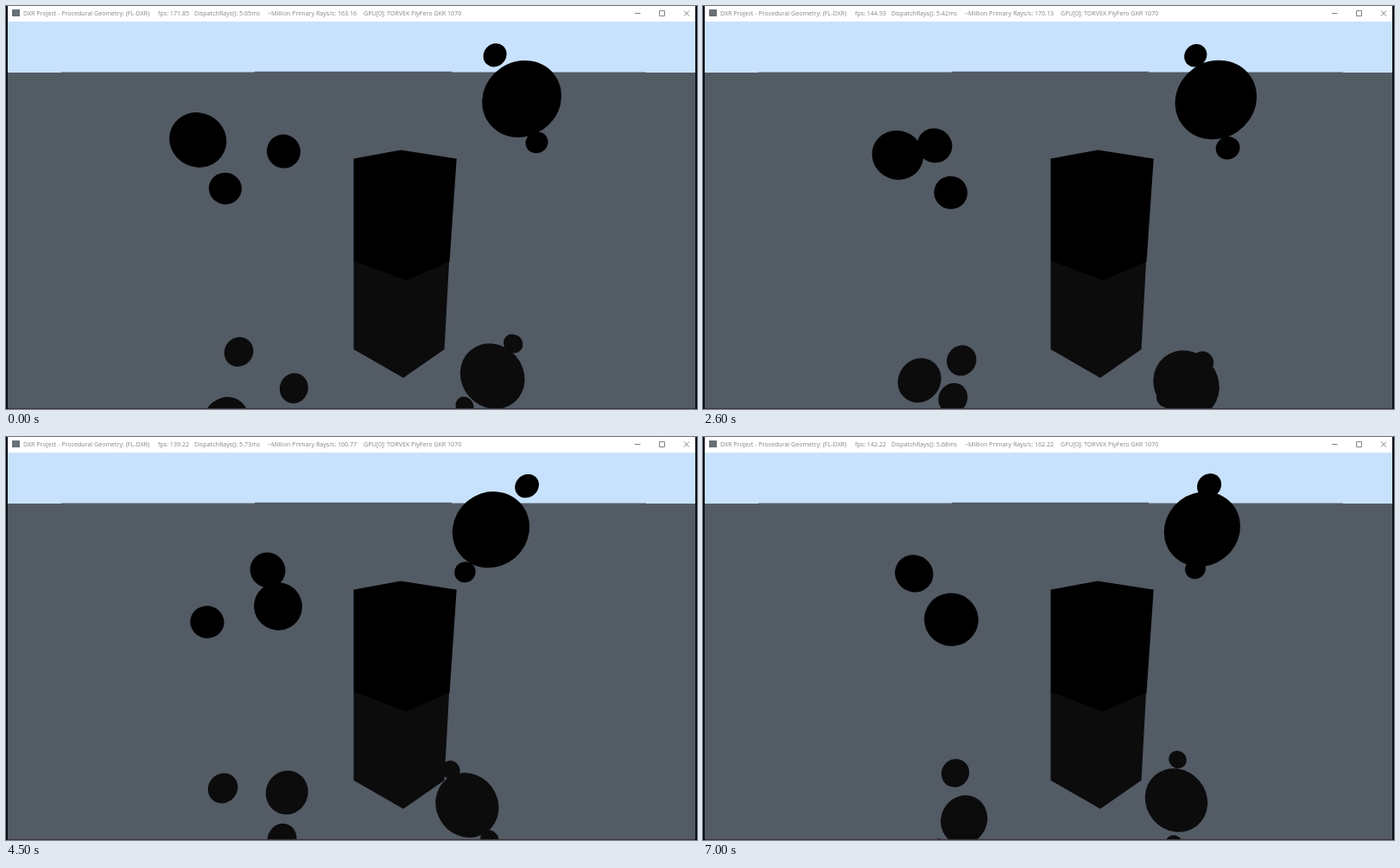
Animation, 800 px wide and 466 px high, one loop 7100 ms. Source, as an HTML page:

```html
<!DOCTYPE html>
<html lang="en">
<head>
<meta charset="utf-8">
<title>Procedural Geometry</title>
<style>
html, body { margin: 0; width: 100%; height: 100%; overflow: hidden; background: #fff; }
svg { display: block; width: 100vw; height: 100vh; }
text { font: 7.1px "Open Sans", "Noto Sans", sans-serif; fill: #858585; }
</style>
</head>
<body>
<svg viewBox="0 0 800 466" preserveAspectRatio="none">
  <rect width="800" height="466" fill="#535b65"/>
  <path d="M0 18H800V77H741V76.4H516V75.8H288V76.4H64V77H0Z" fill="#c8e2fd"/>
  <g id="mirror" fill="#0c0c0d"></g>
  <path d="M402.5 294L463 317L513 296L507.5 397L460 430L402.5 397Z" fill="#0c0c0d"/>
  <path d="M402.5 176.5L457 166.5L521.7 176.5L513.5 296L463 317.5L402.5 294.5Z"/>
  <g id="solid" fill="#000"></g>
  <rect y="465" width="800" height="1" fill="#3b3238"/>
  <rect width="800" height="18" fill="#fff"/>
  <rect x="7" y="4" width="9" height="8" fill="#6b7076"/>
  <text x="20" y="11">DXR Project - Procedural Geometry: (FL-DXR)</text>
  <text id="fps" x="176" y="11"></text>
  <text id="rays" x="218" y="11"></text>
  <text id="rate" x="303" y="11"></text>
  <text x="414" y="11">GPU[0]: TORVEK PlyFero GKR 1070</text>
  <path d="M728 8.5H734.5M756.5 5.5H762.5V11.5H756.5ZM785 5.5L791 11.5M791 5.5L785 11.5" fill="none" stroke="#777" stroke-width=".9"/>
  <path d="M0 0H2V466H0ZM798 0H800V466H798Z" fill="#0d0c13"/>
</svg>
<script>
const LOOP = 7100, STEP = 100;
const FOCAL = 541, MID_X = 400, MID_Y = 242;   // camera
const EYE = 5.3, PITCH = 17.3 * Math.PI / 180;
const SPIN = 114.6;                            // degrees per second

// Turn of both groups in degrees at given times
const turnKeys = [[0, 0], [900, 97.5], [2000, 228], [3200, 360], [4500, 515], [6000, 687], [7000, 794]];

// Start time, frames per second, dispatch ms, million rays
const stats = [
  [0, '171.85', '5.65', '163.16'],
  [1000, '144.93', '5.42', '170.13'],
  [3000, '141.90', '5.69', '161.93'],
  [4000, '139.22', '5.73', '160.77'],
  [5000, '142.22', '5.68', '162.22']
];

// Balls are [x, y, z, radius]; a moving group blends "from" into "to"
const groups = [
  {
    at: [4.29, 13.35],
    from: [[0.3, 5.67, 0.3, 0.3], [-0.3, 4.5, -0.3, 1.035], [-0.73, 3.3, -0.73, 0.3]]
  },
  {
    at: [-2.77, 11.22],
    from: [[-0.6, 2.4, -0.8, 0.405], [0, 2.6, 1, 0.605], [0.8, 3.8, 0.8, 0.405]],
    to: [[0.6, 2.4, 0, 0.405], [0, 3.8, 1, 0.605], [-0.8, 3.4, -0.8, 0.405]]
  }
];

const byId = id => document.getElementById(id);
const lerp = (a, b, u) => a + (b - a) * u;

function addBall(layer) {
  const el = document.createElementNS('http://www.w3.org/2000/svg', 'ellipse');
  byId(layer).appendChild(el);
  return el;
}

for (const g of groups) {
  g.shapes = g.from.map(() => [addBall('solid'), addBall('mirror')]);
}

function turnAt(t) {
  let i = 1;
  while (i < turnKeys.length - 1 && t > turnKeys[i][0]) i++;
  const [t0, a0] = turnKeys[i - 1], [t1, a1] = turnKeys[i];
  return lerp(a0, a1, (t - t0) / (t1 - t0));
}

// Perspective outline of a sphere is an ellipse stretched away from the centre
function project(el, x, y, z, r) {
  const drop = EYE - y;
  const depth = z * Math.cos(PITCH) + drop * Math.sin(PITCH);
  const down = drop * Math.cos(PITCH) - z * Math.sin(PITCH);
  const q = depth * depth - r * r;
  const cx = MID_X + FOCAL * x * depth / q;
  const cy = MID_Y + FOCAL * down * depth / q;
  const angle = Math.atan2(down, x) * 180 / Math.PI;
  el.setAttribute('rx', FOCAL * r * Math.sqrt(q + x * x + down * down) / q);
  el.setAttribute('ry', FOCAL * r / Math.sqrt(q));
  el.setAttribute('transform', `translate(${cx} ${cy}) rotate(${angle})`);
}

function draw(t) {
  const turn = turnAt(t);
  const a = (turn + 139.6) * Math.PI / 180;
  const cos = Math.cos(a), sin = Math.sin(a);
  const blend = 0.5 + 0.5 * Math.cos((turn / SPIN + 0.2) * Math.PI / 6);

  for (const { at, from, to = from, shapes } of groups) {
    shapes.forEach(([solid, mirror], i) => {
      const [px, y, pz, r] = from[i].map((v, k) => lerp(v, to[i][k], blend));
      const x = at[0] + px * cos - pz * sin;
      const z = at[1] + px * sin + pz * cos;
      project(solid, x, y, z, r);
      project(mirror, x, -y, z, r);
    });
  }

  const [, fps, ms, rate] = stats.filter(s => s[0] <= t).pop();
  byId('fps').textContent = `fps: ${fps}`;
  byId('rays').textContent = `DispatchRays(): ${ms}ms`;
  byId('rate').textContent = `~Million Primary Rays/s: ${rate}`;
}

const start = performance.now();
function tick() {
  const t = (performance.now() - start) % LOOP;
  draw(Math.floor(t / STEP) * STEP);
  requestAnimationFrame(tick);
}
tick();
</script>
</body>
</html>
```
